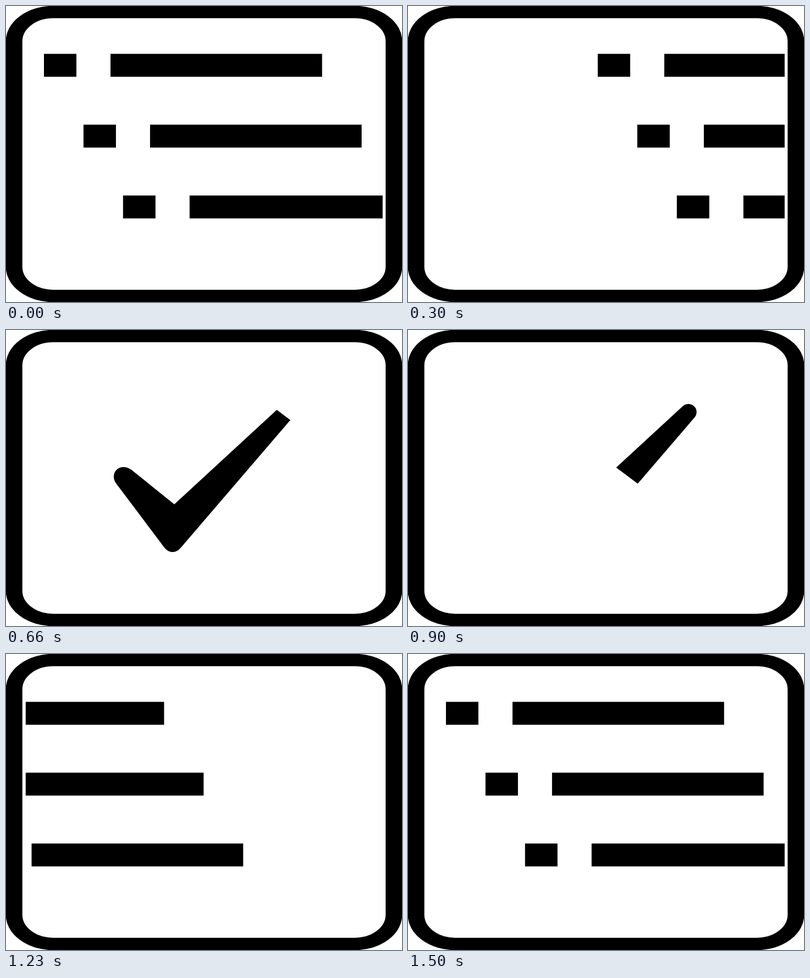
Animation, 720 px wide and 540 px high, one loop 1530 ms. Source, as an HTML page:

```html
<!DOCTYPE html>
<html lang="en">
<head>
<meta charset="utf-8">
<title>List and check</title>
<style>
  html, body { margin: 0; width: 100%; height: 100%; overflow: hidden; background: #fff; }
  svg { display: block; width: 720px; height: 540px; }
</style>
</head>
<body>
<svg viewBox="0 0 720 540">
  <defs>
    <clipPath id="window"><rect x="35.8" y="30" width="649" height="480"/></clipPath>
    <mask id="reveal" maskUnits="userSpaceOnUse" x="0" y="0" width="720" height="540">
      <polyline id="sweep" transform="scale(1.33333 1)" points="132,271 228,367 426,169"
        pathLength="1" fill="none" stroke="#fff" stroke-width="130"/>
    </mask>
  </defs>
  <rect width="720" height="540" fill="#fff"/>
  <rect transform="scale(1.33333 1)" x="11" y="11" width="518" height="518" rx="53.4"
    fill="none" stroke="#000" stroke-width="22.6"/>
  <g clip-path="url(#window)"><g id="list"></g></g>
  <g id="check" mask="url(#reveal)">
    <path d="M306 318 L499 139.5 C505 134 514 133.5 520 139 C526 144 526 153 521.5 159
      L318 397 C309 407.5 297 408 288 397 L201 281 C197 276 195.5 271 196 266
      C197 256 205 250 213 250 C219 250 224 252 228 255 Z"/>
  </g>
</svg>
<script>
const STEP = 30, STEPS = 51;
const $ = id => document.getElementById(id);
const list = $('list'), check = $('check'), sweep = $('sweep');

function addBar(x, y, width) {
  const r = document.createElementNS('http://www.w3.org/2000/svg', 'rect');
  const attrs = { x, y, width, height: 41.8 };
  for (const k in attrs) r.setAttribute(k, attrs[k]);
  list.appendChild(r);
}
for (let row = 0; row < 3; row++) {
  const x = 69 + row * 71.9, y = 87.3 + row * 129.2;
  addBar(x, y, 59);
  addBar(x + 121, y, 384.7);
}

// Smooth 0..1 ramp starting at step a and lasting d steps
function ramp(n, a, d) {
  const x = Math.min(1, Math.max(0, (n - a) / d));
  return x * x * (3 - 2 * x);
}

// Rows speed up to the right, then come in from the left and settle
function shift(n) {
  return n < 24 ? 276 * Math.pow(n / 10, 2.147)
                : -543.4 * (1 - Math.cos(0.12 * (50 - n)));
}

function draw(ms) {
  const n = Math.floor(ms / STEP + 0.001) % STEPS;
  const listOn = n < 15 || n > 33;
  list.setAttribute('visibility', listOn ? 'visible' : 'hidden');
  list.setAttribute('transform', `translate(${listOn ? shift(n).toFixed(2) : 0} 0)`);

  const head = ramp(n, 13.5, 9.94), tail = ramp(n, 24.2, 10);
  check.setAttribute('visibility', head > tail ? 'visible' : 'hidden');
  sweep.setAttribute('stroke-dasharray', `${Math.max(0, head - tail)} 4`);
  sweep.setAttribute('stroke-dashoffset', -tail);
}

const start = performance.now();
function tick() {
  draw(Math.max(0, performance.now() - start));
  requestAnimationFrame(tick);
}
draw(0);
requestAnimationFrame(tick);
</script>
</body>
</html>
```
